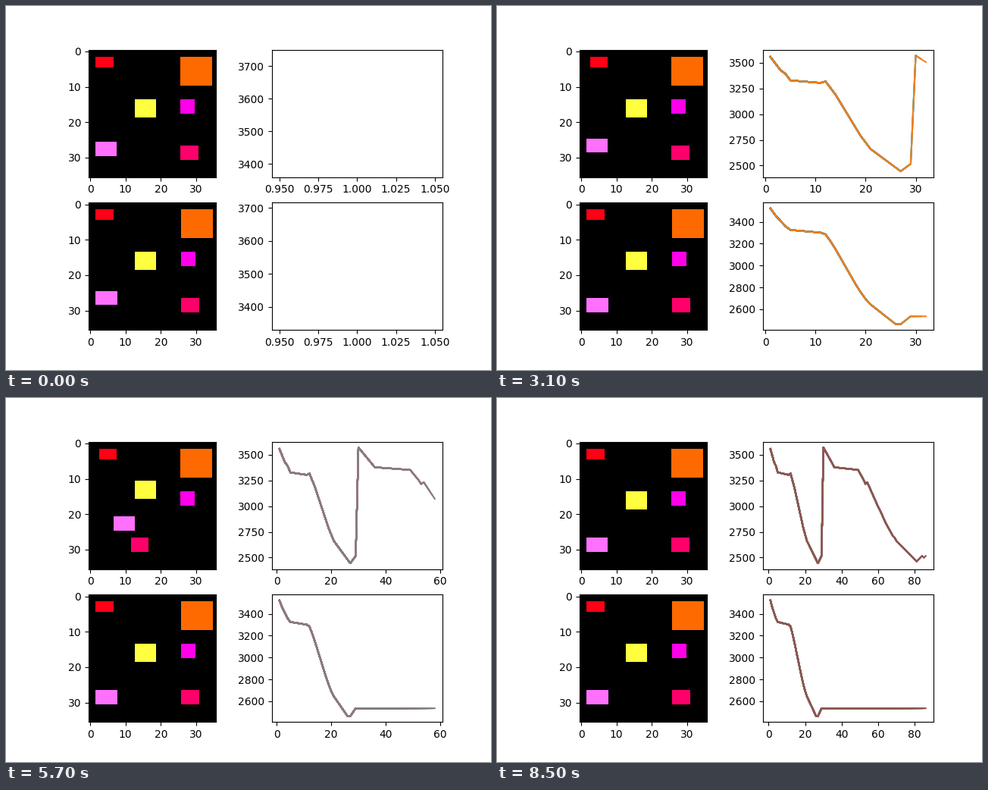
A matplotlib script that plays this animation: 640x480 px, repeating every 8600 ms.

```python
import numpy as np
import matplotlib.pyplot as plt
from matplotlib.animation import FuncAnimation

FRAMES = 86
SIZE = 36
START_COST = 3587

# name: (x, y, width, height, colour)
BLOCKS = {
    "red": (2, 2, 5, 3, (255, 0, 22)),
    "orange": (26, 2, 9, 8, (255, 106, 0)),
    "yellow": (13, 14, 6, 5, (255, 255, 64)),
    "magenta": (26, 14, 4, 4, (255, 0, 232)),
    "pink": (2, 27, 6, 4, (255, 112, 255)),
    "crimson": (26, 27, 5, 4, (255, 0, 106)),
}
STEP = {"up": (0, -1), "left": (-1, 0), "right": (1, 0)}

# (block, direction, repeats, cost change per move)
SHARED_RUN = [
    ("pink", "up", 5, -32), ("red", "right", 2, -18), ("pink", "up", 2, -32),
    ("crimson", "left", 13, -2), ("crimson", "left", 1, 16),
    ("yellow", "up", 4, -32), ("pink", "right", 10, -40),
    ("yellow", "up", 3, -32), ("pink", "right", 1, -32),
    ("pink", "right", 3, -18), ("red", "right", 9, -18),
    ("red", "right", 5, 18),
]
SOLO_RUN = [
    ("red", "right", 1, -18), ("pink", "up", 6, -32),
    ("crimson", "left", 13, -2), ("yellow", "up", 3, -32),
    ("pink", "right", 1, -40), ("crimson", "left", 1, 16),
    ("pink", "right", 6, -40), ("yellow", "up", 1, -32),
    ("pink", "right", 3, -40), ("yellow", "up", 3, -32),
    ("pink", "right", 1, -32), ("pink", "right", 1, -18),
    ("yellow", "up", 1, -32), ("pink", "right", 1, -18),
    ("red", "right", 10, -18), ("red", "right", 3, 18),
    ("pink", "right", 1, -18), ("red", "right", 1, 18),
]


def play(run):
    """Return (positions, cost) after every move; the last one resets the board."""
    home = {name: block[:2] for name, block in BLOCKS.items()}
    pos, cost, states = dict(home), START_COST, []
    for name, way, repeats, change in run:
        dx, dy = STEP[way]
        for _ in range(repeats):
            x, y = pos[name]
            pos[name] = (x + dx, y + dy)
            cost += change
            states.append((dict(pos), cost))
    states[-1] = (home, cost)
    return states


def board(pos):
    grid = np.zeros((SIZE, SIZE, 3), np.uint8)
    for name, (_, _, w, h, colour) in BLOCKS.items():
        x, y = pos[name]
        grid[y:y + h, x:x + w] = colour
    return grid


# Both agents take turns in the first run, then the top one plays alone.
shared, solo = play(SHARED_RUN), play(SOLO_RUN)
top = shared[0::2] + solo
bottom = shared[1::2]
bottom += [bottom[-1]] * (FRAMES - len(bottom))
histories = (top, bottom)

fig, axes = plt.subplots(2, 2, figsize=(6.4, 4.8), dpi=100)
images, curves = [], []
x = np.arange(1, FRAMES + 1)
for (left, right), states in zip(axes, histories):
    images.append(left.imshow(board(states[0][0])))
    costs = [cost for _, cost in states]
    curves.append([right.plot(x[:k + 1], costs[:k + 1], color=f"C{k % 10}")[0]
                   for k in range(FRAMES)])


def update(i):
    for image, lines, states in zip(images, curves, histories):
        image.set_data(board(states[i][0]))
        for k, line in enumerate(lines):
            line.set_visible(k <= i)
        ax = lines[0].axes
        ax.relim(visible_only=True)
        ax.autoscale_view()


anim = FuncAnimation(fig, update, frames=FRAMES, interval=100,
                     repeat=True, repeat_delay=0, blit=False)
plt.show()
```
